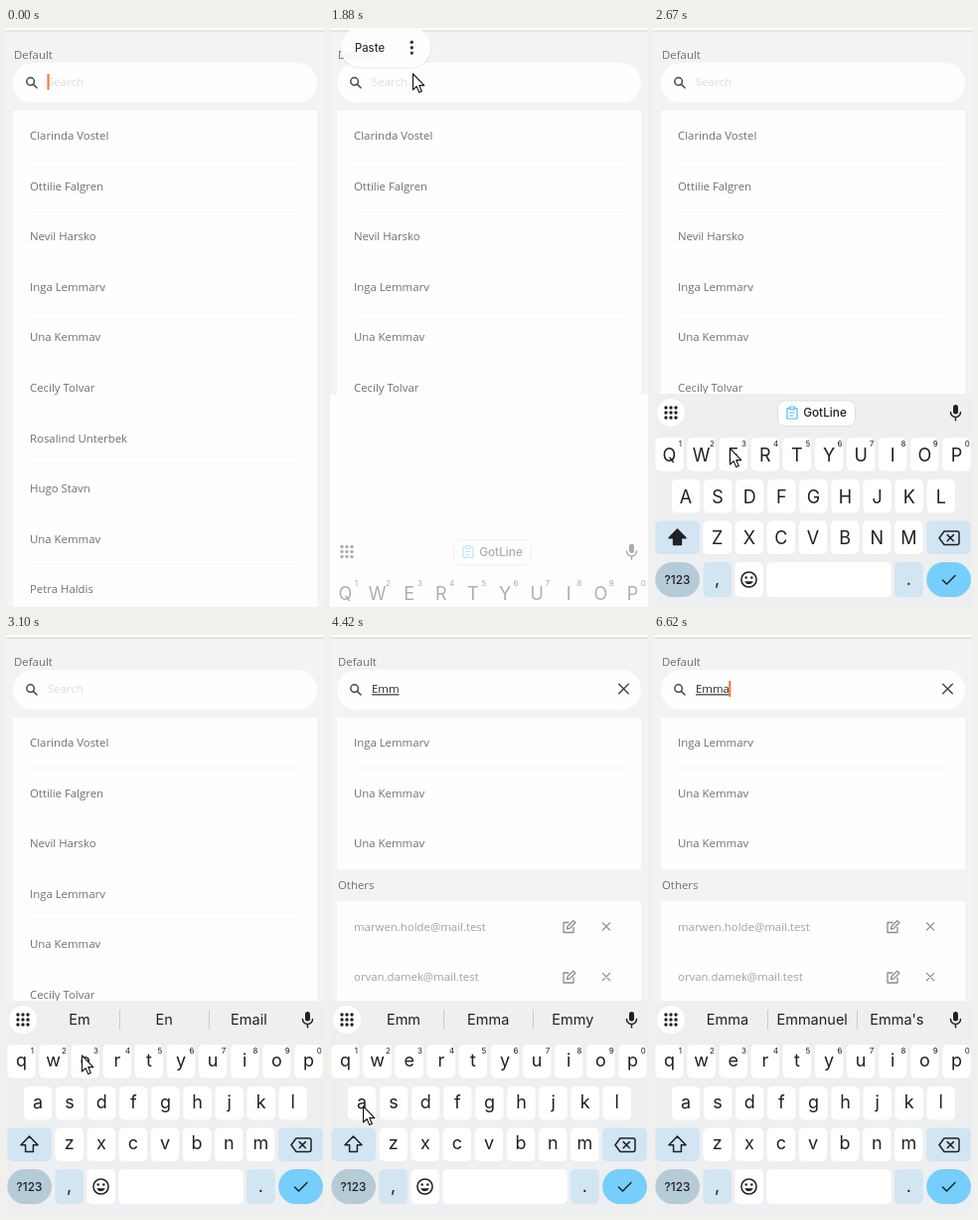
An HTML page for the animation above (6680 ms loop, 320 by 581 pixels).

```html
<!DOCTYPE html>
<html lang="en">
<head>
<meta charset="utf-8">
<title>Search field</title>
<style>
  html, body { margin: 0; width: 100%; height: 100%; overflow: hidden; background: #f3f3f3; }
  svg { display: block; width: 320px; height: 581px; }
  .app { font: 400 11.4px "Open Sans", sans-serif; fill: #707070; }
  .app .soft { fill: #a2a2a2; }
  .app .hint { fill: #dedede; }
  .app .typed { fill: #2a2a2a; text-decoration: underline; }
  .keys { font: 400 18px Inter, sans-serif; fill: #202124; text-anchor: middle; }
  .keys .num { font-size: 8px; }
  .keys .word { font-size: 14.5px; }
  .keys .small { font-size: 11.8px; font-weight: 500; }
  .line { fill: none; stroke: #202124; stroke-width: 1.5; stroke-linecap: round; stroke-linejoin: round; }
  .dark { stroke: #484848; }
  .gray { stroke: #8c8c8c; stroke-width: 1.3; }
</style>
</head>
<body>
<svg id="stage" viewBox="0 0 320 581" xmlns="http://www.w3.org/2000/svg"></svg>
<script>
const LOOP = 6680;
const ROW = 50.55;
const stage = document.getElementById('stage');

const rect = (x, y, w, h, r, fill, extra = '') =>
  `<rect x="${x}" y="${y}" width="${w}" height="${h}" rx="${r}" fill="${fill}" ${extra}/>`;
const text = (x, y, str, cls = '') => `<text x="${x}" y="${y}" class="${cls}">${str}</text>`;
const path = (d, cls = 'line', extra = '') => `<path d="${d}" class="${cls}" ${extra}/>`;
const dot = (x, y, r, fill = '#202124') => `<circle cx="${x}" cy="${y}" r="${r}" fill="${fill}"/>`;
// Group shown only in the given time spans (start, end, start, end, ...)
const during = (spans, body) => `<g data-at="${spans}">${body}</g>`;

/* ---------- app ---------- */
const people = ['Clarinda Vostel', 'Ottilie Falgren', 'Nevil Harsko', 'Inga Lemmarv', 'Una Kemmav',
  'Cecily Tolvar', 'Rosalind Unterbek', 'Hugo Stavn', 'Una Kemmav', 'Petra Haldis'];
const matches = people.filter(name => name.toLowerCase().includes('emma'));
const others = ['marwen.holde@mail.test', 'orvan.damek@mail.test'];

const rows = (list, top, cls = '') => list.map((str, i) => {
  const y = top + ROW * i;
  const rule = i ? rect(24, y - 0.5, 273, 1, 0, '#faf9f8') : '';
  return rule + text(24, y + 29.2, str, cls);
}).join('');

const cross = (x, y, r, cls) =>
  path(`M${x - r} ${y - r}l${2 * r} ${2 * r}m0 ${-2 * r}l${-2 * r} ${2 * r}`, cls);

const rowTools = y =>
  path(`M240 ${y - 4}h-5v10h10v-5M238.5 ${y + 2.5}l.6 -2.8l5.6 -5.6l2.2 2.2l-5.6 5.6z`, 'line gray') +
  cross(278, y, 3.6, 'line gray');

const app = `<g class="app">
  ${rect(0, 0, 320, 581, 0, '#f3f3f3')}
  ${rect(0, 0, 320, 2, 0, '#fcfcfc')}${rect(0, 2, 320, 2, 0, '#e4e4e4')}
  ${text(8, 31, 'Default')}
  ${rect(7, 35, 306, 40, 20, '#fefefe')}
  <circle cx="24.6" cy="53.6" r="3.8" class="line dark"/>${path('M27.6 56.6l3.4 3.4', 'line dark')}
  ${during('0 3760', text(42, 58.3, 'Search', 'hint') +
    rect(7, 83, 306, 500, 0, '#fefefe') + rows(people, 83))}
  ${during('3760 6680', cross(295.5, 54, 4.8, 'line dark') +
    rect(7, 83, 306, 152, 0, '#fefefe') + rows(matches, 83) +
    text(8, 255, 'Others') + rect(7, 267, 306, 300, 0, '#fefefe') + rows(others, 267.5, 'soft') +
    rowTools(292.5) + rowTools(343))}
  ${during('3760 3980', text(42, 58.3, 'Em', 'typed'))}
  ${during('3980 4830', text(42, 58.3, 'Emm', 'typed'))}
  ${during('4830 6680', text(42, 58.3, 'Emma', 'typed'))}
  <rect id="caret" y="46" width="2" height="16" fill="#f0782c"/>
  ${during('960 1780', path('M42.5 62l6.2 6a8.8 8.8 0 1 1 -12.4 0z', '', 'fill="#f0782c"'))}
</g>`;

/* ---------- paste bubble ---------- */
const paste = `<g id="paste">
  ${rect(10, 0.5, 92, 40, 20, '#000', 'opacity=".09"')}
  ${rect(10.5, -0.5, 91, 40, 20, '#fff')}
  <text x="25" y="24" font-family="Inter, sans-serif" font-size="11.3" font-weight="500" fill="#1b1b1b">Paste</text>
  ${[14.3, 19.7, 25.1].map(y => dot(82.3, y, 1.7)).join('')}
</g>`;

/* ---------- keyboard ---------- */
const layout = [['qwertyuiop', 15.5, 411], ['asdfghjkl', 32, 453], ['zxcvbnm', 63.7, 494.5]];
const keyList = layout.flatMap(([chars, x, y]) => [...chars].map((ch, i) => ({ ch, x: x + 32.1 * i, y })));
const BLUE = '#d1e5f2';

const caps = keyList.map(k => rect(k.x - 14.2, k.y, 28.4, 33.5, 5, '#fff')).join('');
const digits = [...'1234567890'].map((d, i) => text(26.4 + 32.1 * i, 420, d, 'num')).join('');
const letters = upper => keyList.map(({ ch, x, y }) =>
  upper ? text(x, y + 23.5, ch.toUpperCase()) : text(x, y + 21.5, ch)).join('');
const shiftIcon = fill =>
  path('M23.5 503l8.5 8.8h-4.6v6.7h-7.8v-6.7h-4.6z', 'line', `style="fill:${fill}"`);

const bubble = (spans, ch, label = ch) => {
  const k = keyList.find(key => key.ch === ch);
  return during(spans, rect(k.x - 24, k.y - 50, 48, 48, 9, '#fff') +
    `<text x="${k.x}" y="${k.y - 18}" font-size="24">${label}</text>`);
};

const words = (spans, ...list) => during(spans,
  list.map((w, i) => text(74 + 85.2 * i, 391.3, w, 'word')).join('') +
  rect(114, 376, 1, 20, 0, '#c9cccf') + rect(204, 376, 1, 20, 0, '#c9cccf'));

const chip = rect(124.5, 374, 78, 25.5, 7, '#fff', 'stroke="#dcdfe2"') +
  path('M136.5 381.5h-2.5v10.5h10v-10.5h-2.5M136.8 380h4.4v2.8h-4.4zM136.5 386h5M136.5 389h3.5', 'line',
    'style="stroke:#53b9ec;stroke-width:1.2"') +
  text(172, 390.4, 'GotLine', 'small');

const gridDots = [-5, 0, 5].flatMap(dx => [-5, 0, 5].map(dy => dot(17 + dx, 386 + dy, 1.7))).join('');

const mic = rect(301, 378, 5, 9.5, 2.5, '#202124') +
  path('M298.5 385.5a5 5 0 0 0 10 0M303.5 390.8v3');

const bottomRow = rect(1.3, 536, 44.7, 35, 17.5, '#b5cbd8') + text(23.5, 558, '?123', 'small') +
  rect(49.5, 536, 28.4, 35, 5, BLUE) + text(63.7, 559, ',') +
  rect(81.5, 536, 28.4, 35, 5, '#fff') +
  '<circle cx="95.5" cy="553.5" r="7.6" class="line"/>' + dot(92.7, 551.5, 1.2) + dot(98.3, 551.5, 1.2) +
  path('M91.3 555.2a4.4 4 0 0 0 8.4 0z', '') +
  rect(113.2, 536, 125.6, 35, 5, '#fff') +
  rect(242, 536, 28.6, 35, 5, BLUE) + text(256.3, 559, '.') +
  rect(274.2, 536, 44.8, 35, 17.5, '#75cefb') + path('M290.5 554l4 4l8.5 -8.5');

const eraser = path('M292 505h13q2 0 2 2v9.5q0 2 -2 2h-13l-5 -6.75z') +
  path('M295.2 508.6l6.2 6.2m0 -6.2l-6.2 6.2');

const keyboard = during('1790 6680', rect(0, 368, 320, 213, 0, '#fefefe')) +
  `<g id="keyboard" class="keys">
  <g id="panel">
    ${rect(0, 367, 320, 214, 0, '#eeeff1')}${dot(17, 386, 14, '#fff')}${caps}
    ${rect(1.3, 494.5, 44.7, 33.5, 5, BLUE)}${rect(274.2, 494.5, 44.8, 33.5, 5, BLUE)}
  </g>
  ${gridDots}${mic}
  ${during('0 2960', chip)}
  ${words('2960 3980', 'Em', 'En', 'Email')}
  ${words('3980 4650', 'Emm', 'Emma', 'Emmy')}
  ${words('4650 6680', 'Emma', 'Emmanuel', 'Emma\'s')}
  ${digits}${eraser}
  ${during('0 2960', letters(true) + shiftIcon('#202124'))}
  ${during('2960 6680', letters(false) + shiftIcon('none'))}
  ${bottomRow}
  ${bubble('2860 2960', 'e', 'E')}
  ${bubble('3570 3650 3820 3900', 'm')}
  ${bubble('4550 4650', 'a')}
</g>`;

const pointer = during('190 6140', `<path id="pointer" fill="#fff" stroke="#111" stroke-width="1.1"
  stroke-linejoin="round" d="M.5 .8v16.2l3.7 -3.4l2.5 6l2.6 -1.1l-2.5 -5.9h5z"/>`);

stage.innerHTML = app + paste + keyboard + pointer;

/* ---------- motion ---------- */
const byId = id => document.getElementById(id);
const clamp = v => Math.min(1, Math.max(0, v));
const part = (t, a, b) => clamp((t - a) / (b - a));
const smooth = p => p * p * (3 - 2 * p);

// Pointer moves: start, end, x, y
const home = { x: 0, y: 278 };
const moves = [[190, 500, 85, 46], [500, 560, 83, 45], [2450, 2670, 76, 421], [3100, 3480, 247, 510],
  [3940, 4400, 33, 472], [5450, 5451, 32, 472], [5770, 6140, 8, 520]];

// Caret spans: start, end, x
const blinks = [[0, 500, 41.5], [1030, 1550, 41.5], [2060, 2570, 41.5], [3760, 3980, 60], [3980, 4090, 69],
  [4600, 4830, 69], [4830, 5110, 75.3], [5630, 6130, 75.3], [6620, LOOP, 75.3]];

const timed = [...stage.querySelectorAll('[data-at]')].map(el => ({ el, at: el.dataset.at.split(' ').map(Number) }));

function pointerAt(t) {
  let { x, y } = home;
  for (const [a, b, toX, toY] of moves) {
    const p = smooth(part(t, a, b));
    x += (toX - x) * p;
    y += (toY - y) * p;
  }
  return `translate(${x} ${y})`;
}

function render(t) {
  for (const { el, at } of timed) {
    const on = at.some((from, i) => i % 2 === 0 && t >= from && t < at[i + 1]);
    el.style.display = on ? '' : 'none';
  }
  byId('pointer').setAttribute('transform', pointerAt(t));

  const blink = blinks.find(([a, b]) => t >= a && t < b);
  byId('caret').style.display = blink ? '' : 'none';
  if (blink) byId('caret').setAttribute('x', blink[2]);

  byId('paste').style.opacity = part(t, 930, 1040) * (1 - part(t, 1870, 1975));

  const drop = 213 * (1 - part(t, 1844, 2038)) ** 2;
  byId('keyboard').setAttribute('transform', `translate(0 ${drop})`);
  byId('keyboard').style.opacity = part(t, 1845, 1945);
  byId('panel').style.opacity = part(t, 1880, 1980);
}

const start = performance.now();
function tick(now) {
  render(Math.max(0, now - start) % LOOP);
  requestAnimationFrame(tick);
}
render(0);
requestAnimationFrame(tick);
</script>
</body>
</html>
```
